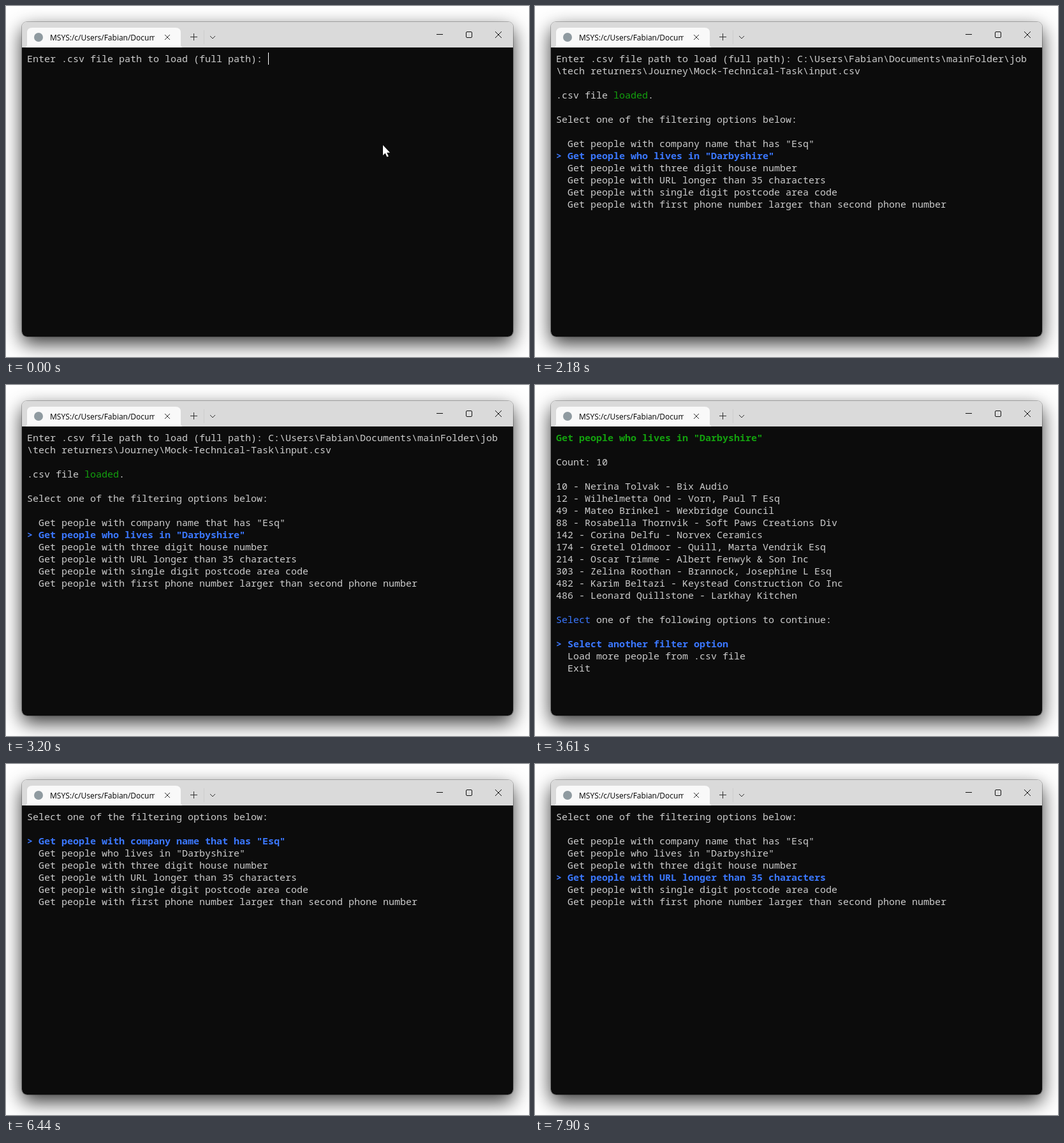
Animation, 820 px wide and 550 px high, one loop 8000 ms. Source, as an HTML page:

```html
<!DOCTYPE html>
<html lang="en">
<head>
<meta charset="utf-8">
<title>Terminal</title>
<style>
  html, body { margin: 0; width: 100%; height: 100%; overflow: hidden; background: #fff; }
  #win {
    position: absolute; left: 25px; top: 25px; width: 770px; height: 493px;
    border-radius: 8px; background: linear-gradient(#dadada 40px, #0c0c0c 40px);
    box-shadow: 0 0 0 1px rgba(0,0,0,.25), 0 11px 30px rgba(0,0,0,.8);
  }
  svg { position: absolute; left: 0; top: 0; }
  #title {
    position: absolute; left: 69px; top: 40px; width: 164px; overflow: hidden;
    font: 12px/19px "Open Sans", sans-serif; white-space: nowrap; color: #000;
  }
  #screen {
    position: absolute; left: 33px; top: 73px; margin: 0; color: #ccc;
    font: 15px/19px "Noto Sans Mono", monospace; font-variant-ligatures: none;
  }
  #screen i { position: absolute; width: 1px; height: 19px; background: #fff; }
  .green { color: #13a10e; }
  .blue { color: #3b78ff; }
  .bold { font-weight: 600; }
</style>
</head>
<body>
<div id="win"></div>
<svg width="820" height="550" fill="none" stroke="#111">
  <path d="M29 65q4 0 4-4V42q0-8 8-8H266q8 0 8 8V61q0 4 4 4z" fill="#f9f9f9" stroke="none"/>
  <circle cx="51" cy="49" r="7" fill="#8f9aa0" stroke="none"/>
  <path d="M249 45l8 8m0-8l-8 8M289 48.5h11m-5.5-5.5v11M320 47l4 4 4-4" stroke="#333"/>
  <path d="M310.5 38v22" stroke="#cdcdcd"/>
  <path d="M675 44.5h10M767 40l10 10m0-10l-10 10"/>
  <rect x="721.5" y="40.5" width="9" height="9" rx="1.5"/>
  <path id="mouse" d="M591 218v16l3.6-3.4 2.8 6 2.4-1-2.8-5.8h5z" fill="#fff" stroke="none"/>
</svg>
<div id="title">MSYS:/c/Users/Fabian/Documents</div>
<pre id="screen"></pre>
<script>
const LOOP = 8000;
const screen_ = document.getElementById('screen');
const mouse = document.getElementById('mouse');

const prompt_ = 'Enter .csv file path to load (full path): ';
const entered = prompt_ + String.raw`C:\Users\Fabian\Documents\mainFolder\job
\tech returners\Journey\Mock-Technical-Task\input.csv`;
const caret = '<i></i>';
const span = (cls, text) => `<span class="${cls}">${text}</span>`;
const loaded = `${entered}\n\n.csv file ${span('green', 'loaded')}.\n\n`;
const heading = 'Select one of the filtering options below:\n\n';

const filters = [
  'Get people with company name that has "Esq"',
  'Get people who lives in "Darbyshire"',
  'Get people with three digit house number',
  'Get people with URL longer than 35 characters',
  'Get people with single digit postcode area code',
  'Get people with first phone number larger than second phone number'
];
const nextSteps = ['Select another filter option', 'Load more people from .csv file', 'Exit'];

const people = `10 - Nerina Tolvak - Bix Audio
12 - Wilhelmetta Ond - Vorn, Paul T Esq
49 - Mateo Brinkel - Wexbridge Council
88 - Rosabella Thornvik - Soft Paws Creations Div
142 - Corina Delfu - Norvex Ceramics
174 - Gretel Oldmoor - Quill, Marta Vendrik Esq
214 - Oscar Trimme - Albert Fenwyk & Son Inc
303 - Zelina Roothan - Brannock, Josephine L Esq
482 - Karim Beltazi - Keystead Construction Co Inc
486 - Leonard Quillstone - Larkhay Kitchen`;

const menu = (items, picked) => items.map((item, n) =>
  n === picked ? span('blue bold', '> ' + item) : '  ' + item).join('\n');
const first = picked => loaded + heading + menu(filters, picked);
const again = picked => heading + menu(filters, picked);
const results = picked => `${span('green bold', filters[1])}\n\nCount: 10\n\n${people}\n\n` +
  `${span('blue', 'Select')} one of the following options to continue:\n\n` + menu(nextSteps, picked);

// Start time in ms and screen content
const scenes = [
  [0, prompt_ + caret], [100, entered + caret], [730, entered],
  [1050, loaded], [1095, loaded + heading], [1140, first(0)],
  [2180, first(1)], [2420, first(2)], [2670, first(3)], [3000, first(2)], [3200, first(1)],
  [3610, results(0)], [5200, results(1)], [5570, results(0)],
  [6440, again(0)], [7310, again(1)], [7540, again(2)], [7900, again(3)]
];

let shown;
function draw() {
  const t = performance.now() % LOOP;
  const scene = scenes.findLast(([start]) => start <= t);
  if (scene !== shown) {
    shown = scene;
    screen_.innerHTML = scene[1];
    mouse.style.display = t < 1050 ? '' : 'none';
  }
  requestAnimationFrame(draw);
}
draw();
</script>
</body>
</html>
```
